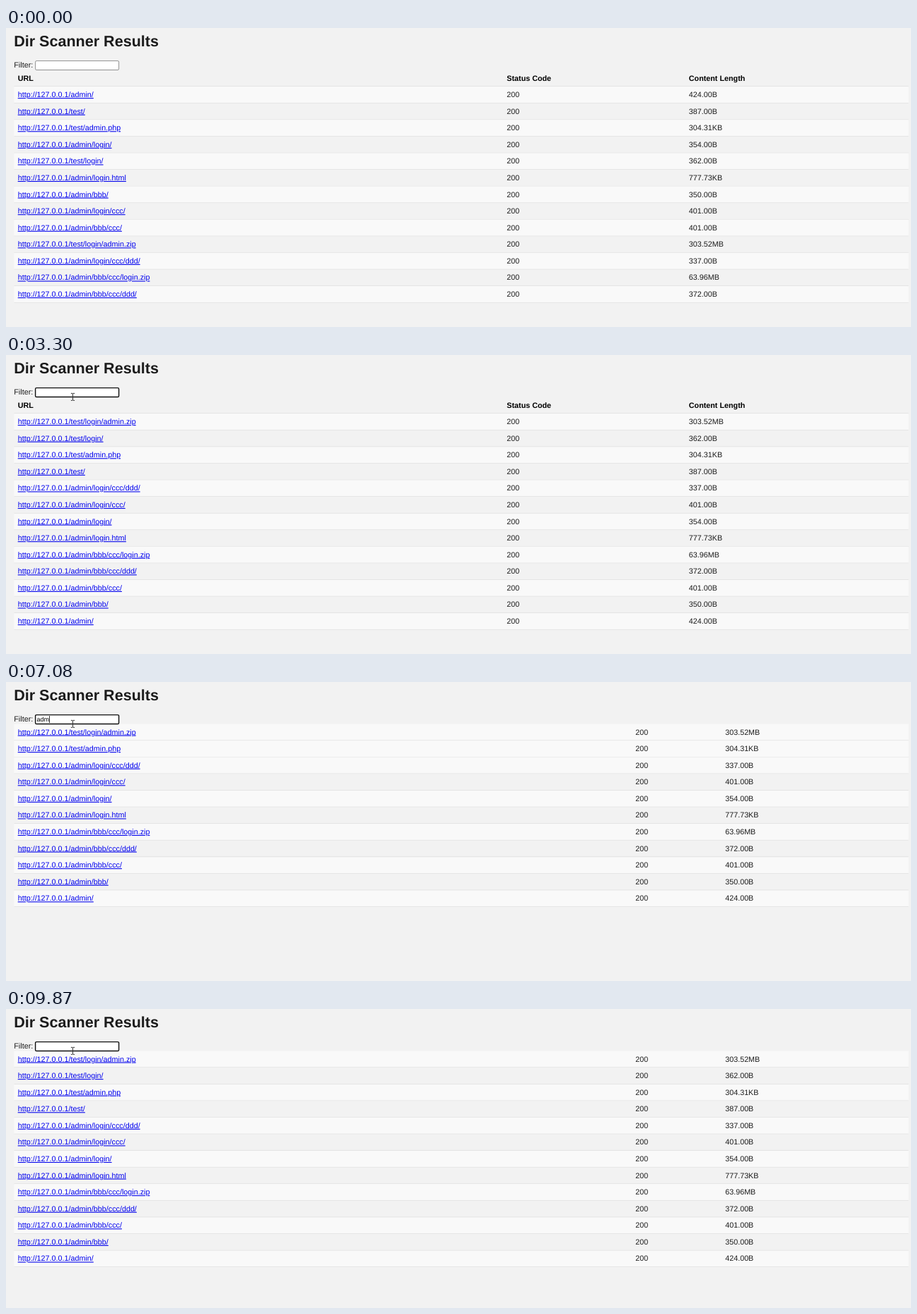
Animation, 1280 px wide and 424 px high, one loop 10000 ms. Source, as an HTML page:

```html
<!DOCTYPE html>
<html lang="en">
<head>
<meta charset="utf-8">
<title>Dir Scanner Results</title>
<style>
  html, body { margin: 0; width: 100%; height: 100%; overflow: hidden; background: #f2f2f2; }
  svg { display: block; width: 1280px; height: 424px; }
  text {
    font: 10.78px "Liberation Sans", Arial, sans-serif;
    fill: #1c1c1c; white-space: pre; text-rendering: geometricPrecision;
  }
  .title { font-size: 21.56px; font-weight: bold; }
  .head text { font-weight: bold; fill: #000; }
  .link { fill: #00e; text-decoration: underline .7px; text-underline-offset: 1.3px; }
  .rule { fill: #ddd; }
  #typed { font-size: 8.98px; fill: #000; }
  #box { fill: #fff; stroke: #767676; stroke-width: .8; }
  #box.hover { stroke: #4f4f4f; }
  #box.focus { stroke: #101010; stroke-width: 1.4; }
  #arrow, #hand { fill: #fff; stroke: #111; stroke-width: .9; stroke-linejoin: round; }
  #beam { fill: none; stroke: #333; stroke-width: 1; }
</style>
</head>
<body>
<svg viewBox="0 0 1280 424">
  <text class="title" x="11.2" y="25.9">Dir Scanner Results</text>
  <text x="11.3" y="55.8">Filter:</text>
  <g id="table"></g>
  <rect id="box" x="41.6" y="46.6" width="118" height="12.9" rx="1.6"/>
  <text id="typed" x="43.6" y="56"></text>
  <rect id="caret" y="48" width=".8" height="10"/>
  <path id="arrow" d="M.5 .5V14.5L3.8 11.4L6.1 16.8L8.3 15.9L6 10.6H10.6Z"/>
  <path id="hand" d="M3.4 10.6V1.8Q3.4 .5 4.6 .5T5.8 1.8V6Q7.6 5.4 8 6.6Q9.6 6.1 9.9 7.3Q11.5 7.1 11.5 8.6V11.8L10.2 14.4V16.5H4.4V14.8L.9 10.2Q.2 9 1.2 8.5T3.4 10.6ZM5.8 6V9M8 6.6V9.2M9.9 7.3V9.5"/>
  <path id="beam" d="M-2.6 -5H-.6L0 -4.5L.6 -5H2.6M0 -4.5V4.5M-2.6 5H-.6L0 4.5L.6 5H2.6"/>
</svg>
<script>
  const LOOP = 10000, TOP = 59.5, PITCH = 23.58;
  const $ = id => document.getElementById(id);

  const data = [
    ["admin/", "424.00B"], ["test/", "387.00B"], ["test/admin.php", "304.31KB"],
    ["admin/login/", "354.00B"], ["test/login/", "362.00B"], ["admin/login.html", "777.73KB"],
    ["admin/bbb/", "350.00B"], ["admin/login/ccc/", "401.00B"], ["admin/bbb/ccc/", "401.00B"],
    ["test/login/admin.zip", "303.52MB"], ["admin/login/ccc/ddd/", "337.00B"],
    ["admin/bbb/ccc/login.zip", "63.96MB"], ["admin/bbb/ccc/ddd/", "372.00B"]
  ];

  // [time, column, direction]
  const sorts = [[0, 0, 0], [810, 1, 1], [1140, 1, -1], [1680, 0, 1], [1880, 0, -1]];

  // [time, text, caret shown]
  const typing = [
    [0, "", 0], [2760, "", 1], [3300, "", 0],
    [3430, "l", 1], [3630, "lo", 1], [3760, "log", 1], [3830, "logi", 1], [3960, "login", 1],
    [4490, "login", 0], [4690, "logi", 1], [4820, "log", 1], [4890, "lo", 1], [4960, "l", 1],
    [5090, "", 0], [5220, "", 1], [5550, "", 0],
    [5620, "a", 1], [5750, "ad", 1], [5820, "adm", 1], [5950, "admi", 1], [6020, "admin", 1],
    [6550, "admin", 0], [6620, "admi", 1], [7080, "adm", 1], [7150, "", 1], [7610, "", 0],
    [7740, "z", 1], [7870, "zip", 1], [8470, "zip", 0], [9000, "zip", 1],
    [9480, "zi", 1], [9610, "z", 1], [9740, "", 1], [9870, "", 0]
  ];

  // [time, x, y] of the pointer
  const path = [
    [130, 774, 337], [400, 905, 150], [667, 991, 68], [1140, 991, 68], [1400, 279, 81],
    [1600, 166, 70], [2070, 166, 70], [2400, 106, 53], [2600, 106, 53], [2800, 94.5, 59.4]
  ];

  const last = (list, t) => list.reduce((hit, item) => item[0] <= t ? item : hit);
  const show = (el, on) => el.setAttribute("visibility", on ? "visible" : "hidden");
  const place = (el, x, y) => el.setAttribute("transform", `translate(${x} ${y})`);

  function add(parent, tag, attrs, text) {
    const el = document.createElementNS("http://www.w3.org/2000/svg", tag);
    for (const key in attrs) el.setAttribute(key, attrs[key]);
    if (text) el.textContent = text;
    return parent.appendChild(el);
  }

  function makeRow(cells, kind, linkClass) {
    const g = add($("table"), "g", { class: kind });
    const bg = add(g, "rect", { x: 11.5, width: 1265, height: PITCH, fill: "none" });
    add(g, "rect", { class: "rule", x: 11.5, y: PITCH - .67, width: 1265, height: .67 });
    const texts = cells.map((c, i) => add(g, "text",
      { x: 16.7, y: 15, class: i ? "" : linkClass }, c));
    return { g, bg, texts };
  }

  function setColumns(row, wide) {
    row.texts[1].setAttribute("x", wide ? 890.2 : 708.3);
    row.texts[2].setAttribute("x", wide ? 1017.2 : 965.8);
  }

  const head = makeRow(["URL", "Status Code", "Content Length"], "head", "");
  place(head.g, 0, TOP);
  setColumns(head, false);
  const rows = data.map(([url, size]) => {
    const full = "http://127.0.0.1/" + url;
    return { ...makeRow([full, "200", size], "row", "link"), keys: [full, size] };
  });

  const compare = (a, b) => a < b ? -1 : a > b ? 1 : 0;
  const orders = sorts.map(([, col, dir]) =>
    [...rows].sort((a, b) => dir * compare(a.keys[col], b.keys[col])));

  function drawTable(t, filter) {
    const filtered = t >= 3430;
    show(head.g, !filtered);
    let slot = filtered ? 0 : 1;
    orders[sorts.indexOf(last(sorts, t))].forEach((row, i) => {
      const on = row.keys[0].includes(filter);
      show(row.g, on);
      if (!on) return;
      place(row.g, 0, TOP + PITCH * slot++);
      row.bg.setAttribute("fill", i % 2 ? "none" : "#f9f9f9");
      setColumns(row, filtered);
    });
  }

  function drawPointer(t) {
    const step = Math.floor((t + 5) * .015) / .015;
    const a = last(path, step), b = path[path.indexOf(a) + 1] || a;
    const k = b === a ? 0 : Math.max(0, (step - a[0]) / (b[0] - a[0]));
    const x = a[1] + (b[1] - a[1]) * k, y = a[2] + (b[2] - a[2]) * k;
    const kind = y > 83 ? "arrow" : y > 60 ? "hand" : "beam";
    for (const id of ["arrow", "hand", "beam"]) {
      show($(id), t >= 130 && id === kind);
      place($(id), x, y);
    }
    $("box").setAttribute("class", t >= 2760 ? "focus" : kind === "beam" ? "hover" : "");
  }

  function draw(t) {
    const [, text, caret] = last(typing, t);
    const typed = $("typed");
    typed.textContent = text;
    show($("caret"), caret);
    $("caret").setAttribute("x", 43.6 + (text ? typed.getComputedTextLength() : 0));
    drawTable(t, text);
    drawPointer(t);
  }

  const start = performance.now();
  function tick() {
    draw((performance.now() - start) % LOOP);
    requestAnimationFrame(tick);
  }
  tick();
</script>
</body>
</html>
```
